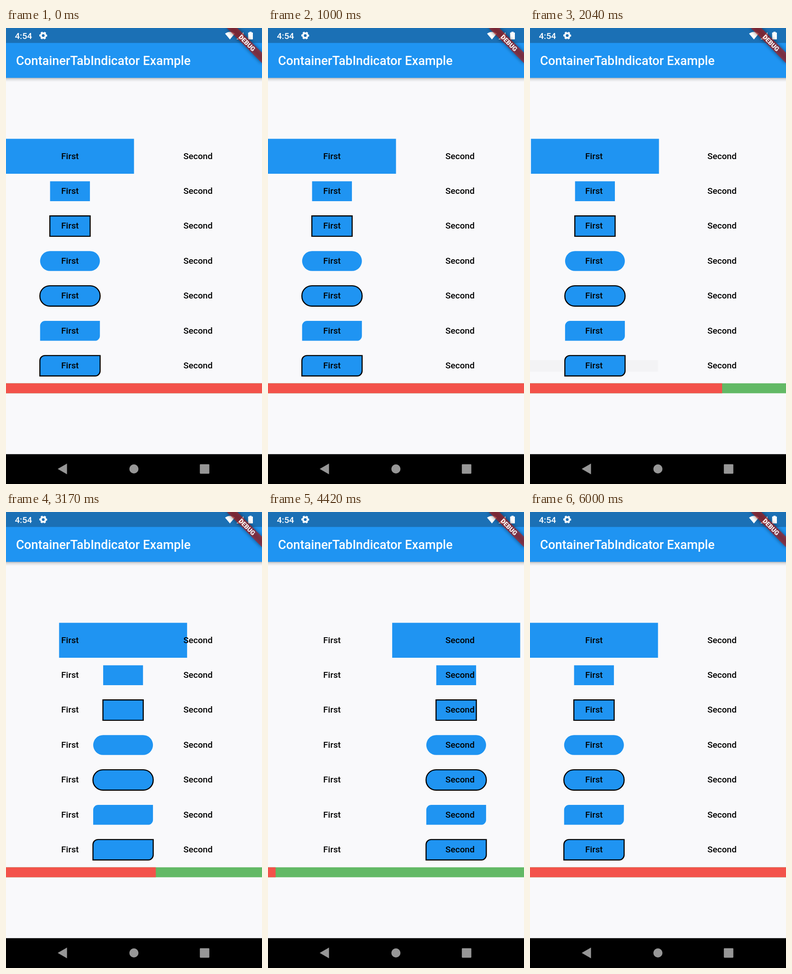
An HTML page for the animation above (6.04 s loop, 561 px wide and 998 px high).

```html
<!DOCTYPE html>
<html lang="en">
<head>
<meta charset="utf-8">
<title>Tab indicators</title>
<style>
  html, body { margin: 0; width: 100%; height: 100%; overflow: hidden; background: #f9f9fb; }
  svg { display: block; width: 100%; height: 100%; }
  text { font-family: Roboto, "Liberation Sans", sans-serif; font-weight: 500; }
  .label { font-size: 19.1px; text-anchor: middle; fill: #000; }
</style>
</head>
<body>
<svg viewBox="0 0 561 998" preserveAspectRatio="none">
  <defs>
    <linearGradient id="shade" x1="0" y1="0" x2="0" y2="1">
      <stop offset="0" stop-color="#000" stop-opacity=".26"/>
      <stop offset=".4" stop-color="#000" stop-opacity=".1"/>
      <stop offset="1" stop-color="#000" stop-opacity="0"/>
    </linearGradient>
    <filter id="soft" x="-30%" y="-150%" width="160%" height="400%">
      <feGaussianBlur stdDeviation="4.5"/>
    </filter>
  </defs>

  <rect width="561" height="998" fill="#f9f9fb"/>

  <!-- app bar -->
  <rect y="109" width="561" height="9" fill="url(#shade)"/>
  <rect width="561" height="109.1" fill="#1f94f2"/>
  <rect width="561" height="32.7" fill="#1b70b5"/>
  <text x="22" y="81.3" font-size="27.27" fill="#fff">ContainerTabIndicator Example</text>

  <!-- status bar -->
  <text x="19.5" y="23.8" font-size="19.1" fill="#fff">4:54</text>
  <g fill="none" stroke="#fff" transform="translate(81.6 16.5)">
    <circle r="5" stroke-width="3.8"/>
    <circle r="7.2" stroke-width="2.8" stroke-dasharray="4.1 3.44" transform="rotate(-16)"/>
  </g>
  <g fill="#fff">
    <path d="M480 12.2Q490.7 4.6 501.4 12.2L490.7 25Z"/>
    <path d="M505 25L520.5 9V25Z"/>
    <path d="M533.4 8.2h4.8v1.6h1.7q1.1 0 1.1 1.1v13q0 1.1-1.1 1.1h-8.2q-1.1 0-1.1-1.1v-13q0-1.1 1.1-1.1h1.7z"/>
  </g>
  <g transform="translate(561 0) rotate(45)">
    <rect x="-54.5" y="38.2" width="109" height="16.3" fill="#000" fill-opacity=".5" filter="url(#soft)"/>
    <rect x="-54.5" y="38.2" width="109" height="16.3" fill="#b71c1c" fill-opacity=".627"/>
    <text y="51.3" font-size="13.9" text-anchor="middle" fill="#fff" style="font-weight:900">DEBUG</text>
  </g>

  <!-- tabs -->
  <rect id="press" y="727" width="280.5" height="25" fill="#000" opacity="0"/>
  <g id="marks" fill="#1f94f2"></g>
  <g id="labels"></g>

  <!-- pages -->
  <rect y="777.6" width="561" height="21.8" fill="#62b965"/>
  <rect id="red" y="777.6" width="561" height="21.8" fill="#f3524a"/>

  <!-- navigation -->
  <rect y="932.7" width="561" height="65.3" fill="#000"/>
  <g fill="#979797">
    <path d="M113.3 965L133.7 953.2V976.8Z"/>
    <circle cx="280.3" cy="965" r="10"/>
    <rect x="424.8" y="954.7" width="20.8" height="20.8" rx="1.4"/>
  </g>
</svg>
<script>
const NS = "http://www.w3.org/2000/svg";
const LOOP = 6040, HALF = 280.5, PITCH = 76.4, TOP = 242.6;
const $ = id => document.getElementById(id);

function add(parent, tag, attrs, content) {
  const el = document.createElementNS(NS, tag);
  for (const k in attrs) el.setAttribute(k, attrs[k]);
  if (content) el.textContent = content;
  parent.appendChild(el);
}

// Rectangle rounded by a at top left / bottom right and by b at the other corners.
function box(cy, w, h, a, b) {
  const x = HALF / 2 - w / 2, y = cy - h / 2;
  const arc = (r, dx, dy) => r ? `a${r} ${r} 0 0 1 ${dx * r} ${dy * r}` : "";
  return `M${x + a} ${y}h${w - a - b}${arc(b, 1, 1)}v${h - a - b}${arc(a, -1, 1)}` +
    `h${a + b - w}${arc(b, -1, -1)}v${a + b - h}${arc(a, 1, -1)}z`;
}

// width, height, radius a, radius b, outlined
const shapes = [
  [HALF, PITCH, 0, 0, 0],
  [87.3, 43.6, 0, 0, 0],
  [87.3, 43.6, 0, 0, 1],
  [131, 43.6, 21.8, 21.8, 0],
  [131, 43.6, 21.8, 21.8, 1],
  [131, 43.6, 10.9, 0, 0],
  [131, 43.6, 10.9, 0, 1]
];
shapes.forEach(([w, h, a, b, outlined], i) => {
  const cy = TOP + PITCH * (i + 0.5);
  // outlines sit slightly outside the fill
  const grow = outlined ? 1 : 0;
  add($("marks"), "path", {
    d: box(cy, w + grow, h + grow, a, b),
    stroke: outlined ? "#000" : "none", "stroke-width": 2.4
  });
  ["First", "Second"].forEach((name, n) =>
    add($("labels"), "text", { class: "label", x: HALF * (n + 0.5), y: cy + 5.7 }, name));
});

// CSS "ease" solved by bisection.
function ease(x) {
  if (x <= 0) return 0;
  if (x >= 1) return 1;
  let lo = 0, hi = 1, s;
  for (let i = 0; i < 24; i++) {
    s = (lo + hi) / 2;
    const at = 0.75 * s * (1 - s) ** 2 + 0.75 * s * s * (1 - s) + s ** 3;
    if (at < x) lo = s; else hi = s;
  }
  return 0.3 * s * (1 - s) ** 2 + 3 * s * s * (1 - s) + s ** 3;
}

const TAPS = [1130, 1776], PAGE_LAG = 130, TAP_MS = 300;
const DRAG = [
  [2620, 0], [3167, .415], [3500, .68], [3640, .9], [3760, .98], [3860, 1],
  [4375, 1], [4417, .97], [5167, .385], [5300, .2], [5420, .06], [5540, 0]
];

function dragged(t) {
  const i = DRAG.findIndex(k => k[0] > t);
  if (i < 1) return 0;
  const [t0, p0] = DRAG[i - 1], [t1, p1] = DRAG[i];
  return p0 + (p1 - p0) * (t - t0) / (t1 - t0);
}

function tapped(t, lag) {
  return ease((t - TAPS[0] - lag) / TAP_MS) - ease((t - TAPS[1] - lag) / TAP_MS);
}

function draw(t) {
  const drag = dragged(t);
  $("marks").setAttribute("transform", `translate(${HALF * (tapped(t, 0) + drag)} 0)`);
  $("red").setAttribute("width", 561 * (1 - tapped(t, PAGE_LAG) - drag));

  const second = t < TAPS[1] - 100;
  const age = t - TAPS[second ? 0 : 1];
  const glow = Math.max(0, Math.min((age + 100) / 100, 1, (340 - age) / 340));
  $("press").setAttribute("x", second ? HALF : 0);
  $("press").setAttribute("opacity", 0.1 * glow);
}

// The picture advances 24 times a second.
const start = performance.now();
function tick() {
  const t = Math.max(0, performance.now() - start) % LOOP;
  draw(Math.floor((t + 5) * 0.024) / 0.024);
  requestAnimationFrame(tick);
}
tick();
</script>
</body>
</html>
```
